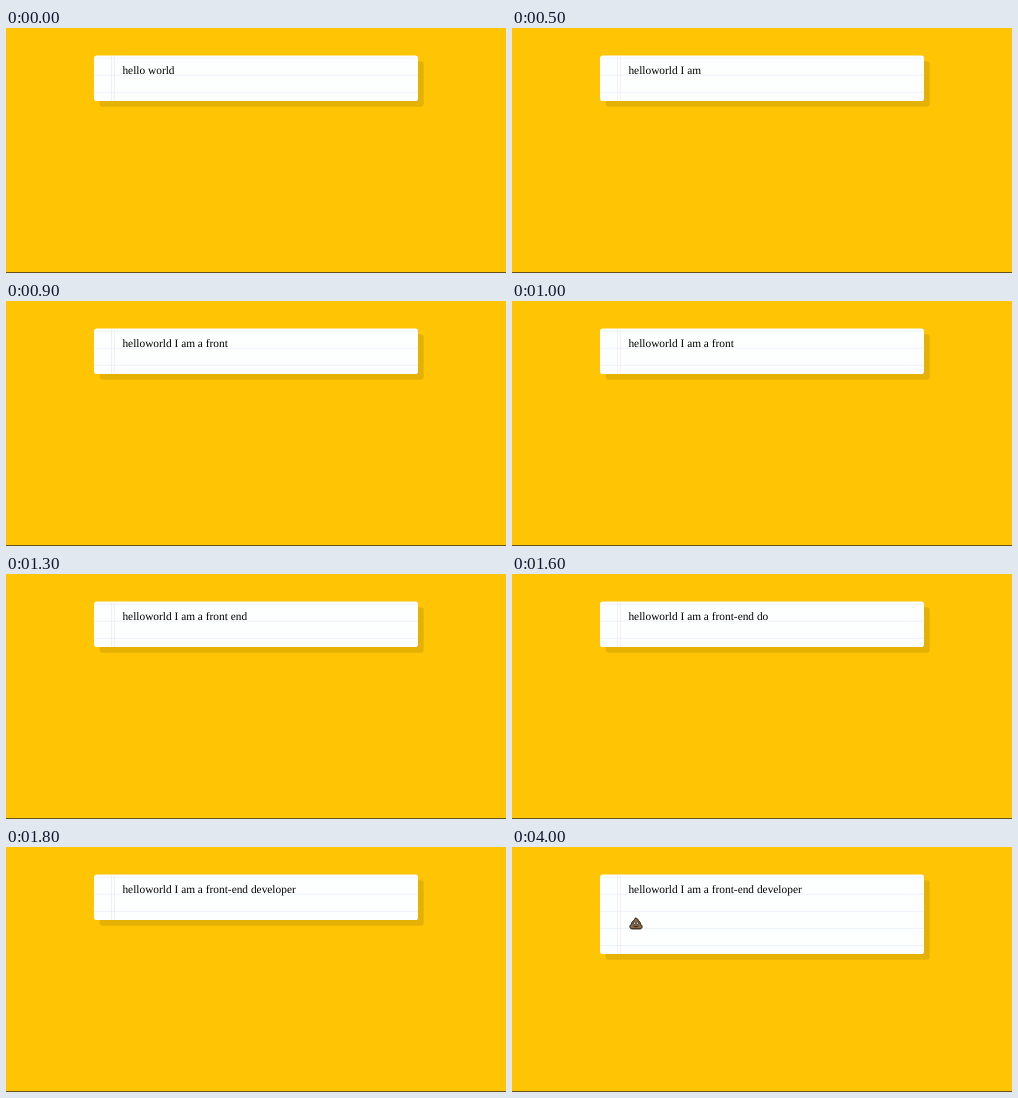
An HTML page that plays this animation: 500 by 245 pixels, repeating every 4400 ms.

```html
<!DOCTYPE html>
<html lang="en">
<head>
<meta charset="utf-8">
<title>Dictation note</title>
<style>
  html, body { margin: 0; width: 100%; height: 100%; overflow: hidden; background: #ffc504; }
  svg { display: block; width: 500px; height: 245px; }
  text { font: 20px "Liberation Serif", "Times New Roman", serif; text-rendering: geometricPrecision; }
  .paper { fill: #fdfefe; }
  .shadow { fill: #000; fill-opacity: .1; }
  .rule { fill: #e4eff5; }
  .margin { fill: #e9e4e6; }
</style>
</head>
<body>
<svg viewBox="0 0 500 245">
  <rect y="244" width="500" height="1" fill="#66521a"/>
  <!-- the note is laid out 570 units wide -->
  <g transform="translate(88 27.5) scale(.5684)">
    <rect class="shadow sheet" x="10" y="10" width="570" rx="5"/>
    <rect class="paper sheet" width="570" rx="5"/>
    <g id="rules"></g>
    <rect class="margin sheet" x="30" width="1"/>
    <rect class="margin sheet" x="35" width="1"/>
    <text id="words" x="50" y="32"></text>
  </g>
  <g id="pile" transform="translate(124 76.6)" stroke="#1b1611" stroke-width="1" stroke-linejoin="round">
    <path fill="#8c6b4b" d="M-.8-5.6C1.4-5.4 2.5-4 2.2-2.6C4-2.4 4.6-1 4.1.5C6.4.9 7 4.9 4.4 5.3H-4.4C-7 4.9-6.4.9-4.1.5C-4.6-1-4-2.4-2.2-2.6C-2.4-4-.6-4.2-.8-5.6Z"/>
    <g fill="#eee" stroke-width=".6">
      <circle cx="-1.5" cy="-.4" r="1.1"/>
      <circle cx="1.5" cy="-.4" r="1.1"/>
    </g>
    <path fill="none" stroke-width=".9" d="M-2.4 2.3Q0 4.2 2.4 2.3"/>
  </g>
</svg>
<script>
  const LOOP = 4400, LINE = 30, PILE_AT = 4000;
  const start = "helloworld I am";
  const phrases = [
    [0, "hello world"],
    [500, start],
    [600, start + " a"],
    [800, start + " a free"],
    [900, start + " a front"],
    [1300, start + " a front end"],
    [1400, start + " a front-end"],
    [1600, start + " a front-end do"],
    [1700, start + " a front-end develop"],
    [1800, start + " a front-end developer"]
  ];
  const byId = id => document.getElementById(id);
  const words = byId("words"), rules = byId("rules"), pile = byId("pile");
  const sheets = document.querySelectorAll(".sheet");

  for (let i = 0; i < 5; i++) {
    const rule = document.createElementNS("http://www.w3.org/2000/svg", "rect");
    const attrs = { class: "rule", y: 4 + i * LINE, width: 570, height: 1.2 };
    for (const key in attrs) rule.setAttribute(key, attrs[key]);
    rules.append(rule);
  }

  let shown = "";
  function draw(now) {
    const t = now % LOOP;
    const phrase = phrases.filter(([at]) => at <= t).pop()[1];
    const tall = t >= PILE_AT;
    const state = phrase + tall;
    if (state !== shown) {
      shown = state;
      words.textContent = phrase;
      pile.style.display = tall ? "" : "none";
      const height = tall ? 140 : 80;
      sheets.forEach(s => s.setAttribute("height", height));
      [...rules.children].forEach((r, i) => {
        r.style.display = 4 + i * LINE < height ? "" : "none";
      });
    }
  }

  const begin = performance.now();
  function tick() {
    draw(performance.now() - begin);
    requestAnimationFrame(tick);
  }
  tick();
</script>
</body>
</html>
```
